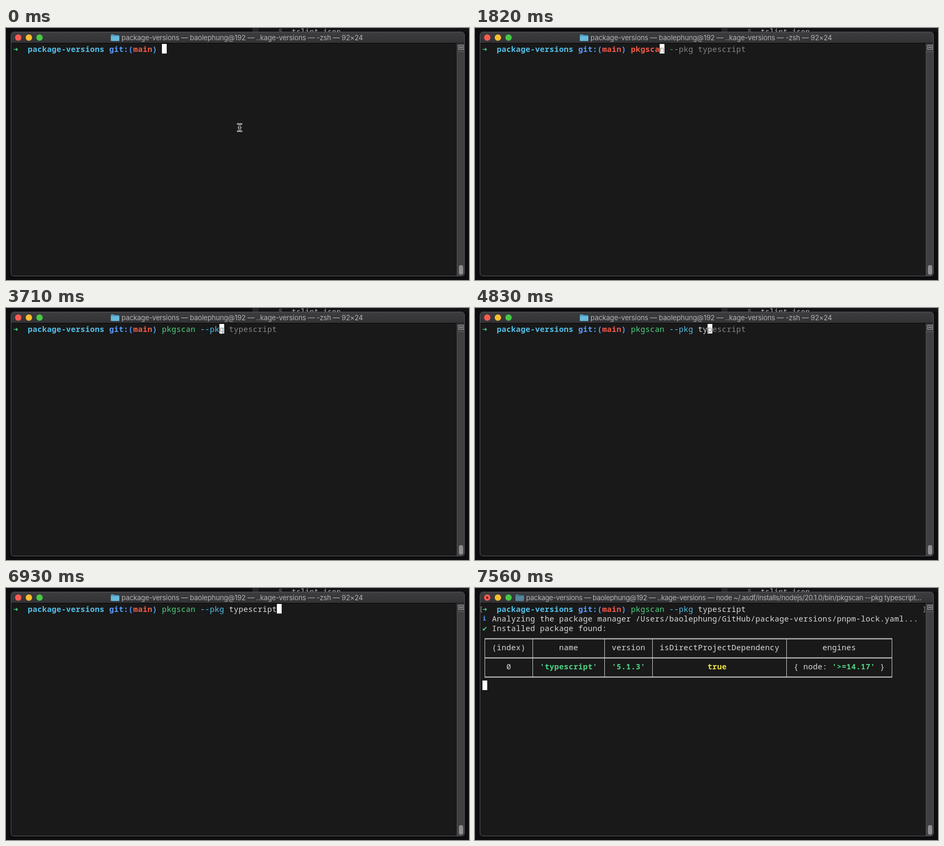
An HTML page for the animation above (7.63 s loop, 870 by 474 pixels).

```html
<!DOCTYPE html>
<html lang="en">
<head>
<meta charset="utf-8">
<title>Terminal session</title>
<style>
html, body { margin: 0; width: 100%; height: 100%; overflow: hidden; background: #0d0d0f; }
#stage { position: relative; width: 870px; height: 474px; overflow: hidden; }
#stage > svg, .title, .row, .cursor, .edge { position: absolute; white-space: pre; }
svg { left: 0; top: 0; }
.row, .edge, .behind {
  font: 500 14.5px/18px "Noto Sans Mono", "DejaVu Sans Mono", monospace;
  letter-spacing: .3px; color: #dadada;
}
.behind { font-size: 13.5px; }
.row { left: 14px; height: 18px; }
.title {
  top: 8px; font: 13px/20px Inter, "Open Sans", sans-serif;
  letter-spacing: -.13px; color: #b3b3b5;
}
.title.tight { letter-spacing: -.31px; }
.cursor { width: 9px; height: 18px; background: #fff; }
.edge { top: 31px; font-size: 12px; color: #9a9a9a; }
.bold { font-weight: 700; }
.semi { font-weight: 600; }
.small { font-size: 11.5px; }
.green { color: #4fd583; }
.cyan { color: #53c1ea; }
.blue { color: #5a9bfb; }
.red { color: #f25a45; }
.yellow { color: #efe544; }
.ghost { color: #858585; }
.hidden { visibility: hidden; }
</style>
</head>
<body>
<div id="stage">
  <svg width="870" height="474">
    <defs>
      <linearGradient id="bar" x2="0" y2="1">
        <stop stop-color="#3d3d40"/><stop offset="1" stop-color="#333336"/>
      </linearGradient>
      <path id="beam" d="M435.5 180.5Q439 180.500 439 183V191Q439 194 435.5 194M442.5 180.5Q439 180.5 439 183V191Q439 194 442.5 194M437 187.5H441"/>
    </defs>
    <rect x="463" width="12" height="8" fill="#252528"/>
    <rect x="475" width="395" height="8" fill="#141416"/>
    <g class="behind" fill="#b8b8b8">
      <text x="512" y="11.5" fill="#717174">5</text><text x="537" y="11.5">tslint.json</text>
    </g>
    <rect x="9.5" y="7.5" width="852" height="459" rx="5" fill="#191919" stroke="#58585a"/>
    <path d="M10 28V13a5 5 0 0 1 5-5H856a5 5 0 0 1 5 5V28Z" fill="url(#bar)"/>
    <path d="M10 28.5H861" stroke="#080808"/>
    <circle cx="23" cy="18" r="6" fill="#f95b52"/>
    <circle cx="43" cy="18" r="6" fill="#f8bd30"/>
    <circle cx="63" cy="18" r="6" fill="#46c943"/>
    <circle id="busy" cx="23" cy="18" r="2" fill="#6b0f0b"/>
    <g id="folder">
      <path d="M0 13.5q0-1.5 1.5-1.5H5.5L7 13.5H14.5q1.5 0 1.5 1.5V24H0Z" fill="#4aa0c6"/>
      <path d="M0 15.5H16V23q0 1.5-1.5 1.5H1.5Q0 24.5 0 23Z" fill="#69b9db"/>
    </g>
    <path d="M847 29H861V461q0 5-5 5H847Z" fill="#3e4042"/>
    <path d="M847.5 29V466" stroke="#505254"/>
    <path d="M848 44.5H861" stroke="#5d5f61"/>
    <path d="M850.5 32.5H859.5V40.5H850.5ZM852 35.5H858M852 37.5H858" fill="none" stroke="#a4a5a6"/>
    <rect x="851" y="446" width="8" height="18" rx="4" fill="#8d8e8f"/>
    <g id="pointer" fill="none" stroke-linecap="round">
      <use href="#beam" stroke="#e8e8e8" stroke-width="3"/>
      <use href="#beam" stroke="#111"/>
    </g>
    <g id="grid" stroke="#c8c8c8">
      <path d="M18 95.5H784M18 131.5H784M18 167.5H784" stroke-width="2"/>
      <path d="M18.5 95V168M108.5 95V168M243.5 95V168M333.5 95V168M585.5 95V168M783.5 95V168"/>
    </g>
  </svg>
  <div class="title" id="title"></div>
  <div class="edge" style="left:8px">[</div>
  <div class="edge" style="left:841px">]</div>
  <div class="cursor" id="cursor"></div>
</div>
<script>
const LOOP = 7630, CELL = 9, LINE = 18, PROMPT = 31;
const COMMAND = "pkgscan --pkg typescript";
const KEYS = [210, 560, 910, 1330, 1610, 1820, 2100, 2450, 2940, 3150, 3430, 3710,
  4130, 4340, 4620, 4830, 5180, 5320, 5600, 5880, 6160, 6580, 6790, 6930];
const POINTER_OFF = 280, ENTER = 7070, RUN = 7140, NODE = 7350, INFO = 7420, FOUND = 7490, TABLE = 7560;
const TITLES = [
  { from: 0, x: 197, text: "package-versions — baolephung@192 — ..kage-versions — -zsh — 92×24" },
  { from: RUN, x: 82, text: "package-versions — pkgscan --pkg typescript — pkgscan — sed ◂ asdf exec pkgscan --pkg typescript — 92×24" },
  { from: NODE, x: 76, tight: true, text: "package-versions — baolephung@192 — ..kage-versions — node ~/.asdf/installs/nodejs/20.1.0/bin/pkgscan --pkg typescript…" }
];

const $ = id => document.getElementById(id);
const stage = $("stage"), edges = [...document.querySelectorAll(".edge")];
const show = (el, on) => el.classList.toggle("hidden", !on);

// Each part is [column, text, classes].
function row(line, ...parts) {
  const el = document.createElement("div");
  el.className = "row";
  el.style.top = 30 + line * LINE + "px";
  for (const [col, text, cls = ""] of parts) {
    const span = document.createElement("span");
    span.textContent = text;
    span.className = cls;
    span.style.cssText = `position:absolute;left:${col * CELL}px`;
    el.append(span);
  }
  stage.append(el);
  return el;
}

row(0, [0, "➜", "bold green"], [3, "package-versions", "bold cyan"], [20, "git:(", "bold blue"],
  [25, "main", "bold red"], [29, ")", "bold blue"]);
const letters = [...row(0, ...[...COMMAND].map((c, i) => [PROMPT + i, c])).children];
const info = row(1, [0, "ℹ", "blue bold small"],
  [2, "Analyzing the package manager /Users/baolephung/GitHub/package-versions/pnpm-lock.yaml..."]);
const found = row(2, [0, "✔", "green"], [2, "Installed package found:"]);
const table = [
  $("grid"),
  row(4, [2, "(index)"], [16, "name"], [27, "version"], [37, "isDirectProjectDependency"], [71, "engines"]),
  row(6, [5, "0"], [12, "'typescript'", "green semi"], [27, "'5.1.3'", "green semi"], [47, "true", "yellow semi"],
    [65, "{ node:"], [73, "'>=14.17'", "green semi"], [83, "}"])
];

function letterClass(i, typed) {
  if (i >= typed) return typed ? "ghost" : "hidden";
  if (i < 7) return typed < 7 ? "red bold" : "green";
  return i < 13 ? "cyan" : "";
}

function draw(t) {
  const typed = KEYS.filter(k => k <= t).length;
  letters.forEach((el, i) => el.className = letterClass(i, typed));

  const title = TITLES.findLast(s => s.from <= t);
  $("title").textContent = title.text;
  $("title").style.left = title.x + 20 + "px";
  $("title").classList.toggle("tight", !!title.tight);
  $("folder").setAttribute("transform", `translate(${title.x} 0)`);
  $("folder").setAttribute("opacity", t < RUN ? 1 : .6);

  show($("busy"), t >= RUN);
  show($("pointer"), t < POINTER_OFF);
  edges.forEach(el => show(el, t >= ENTER));
  show(info, t >= INFO);
  show(found, t >= FOUND);
  table.forEach(el => show(el, t >= TABLE));

  const line = t < ENTER ? 0 : t < INFO ? 1 : t < FOUND ? 2 : t < TABLE ? 3 : 8;
  const col = t < ENTER ? PROMPT + typed : 0;
  $("cursor").style.left = 14 + col * CELL + "px";
  $("cursor").style.top = 30 + line * LINE + "px";
}

const start = performance.now();
function tick() {
  draw((performance.now() - start) % LOOP);
  requestAnimationFrame(tick);
}
draw(0);
tick();
</script>
</body>
</html>
```
